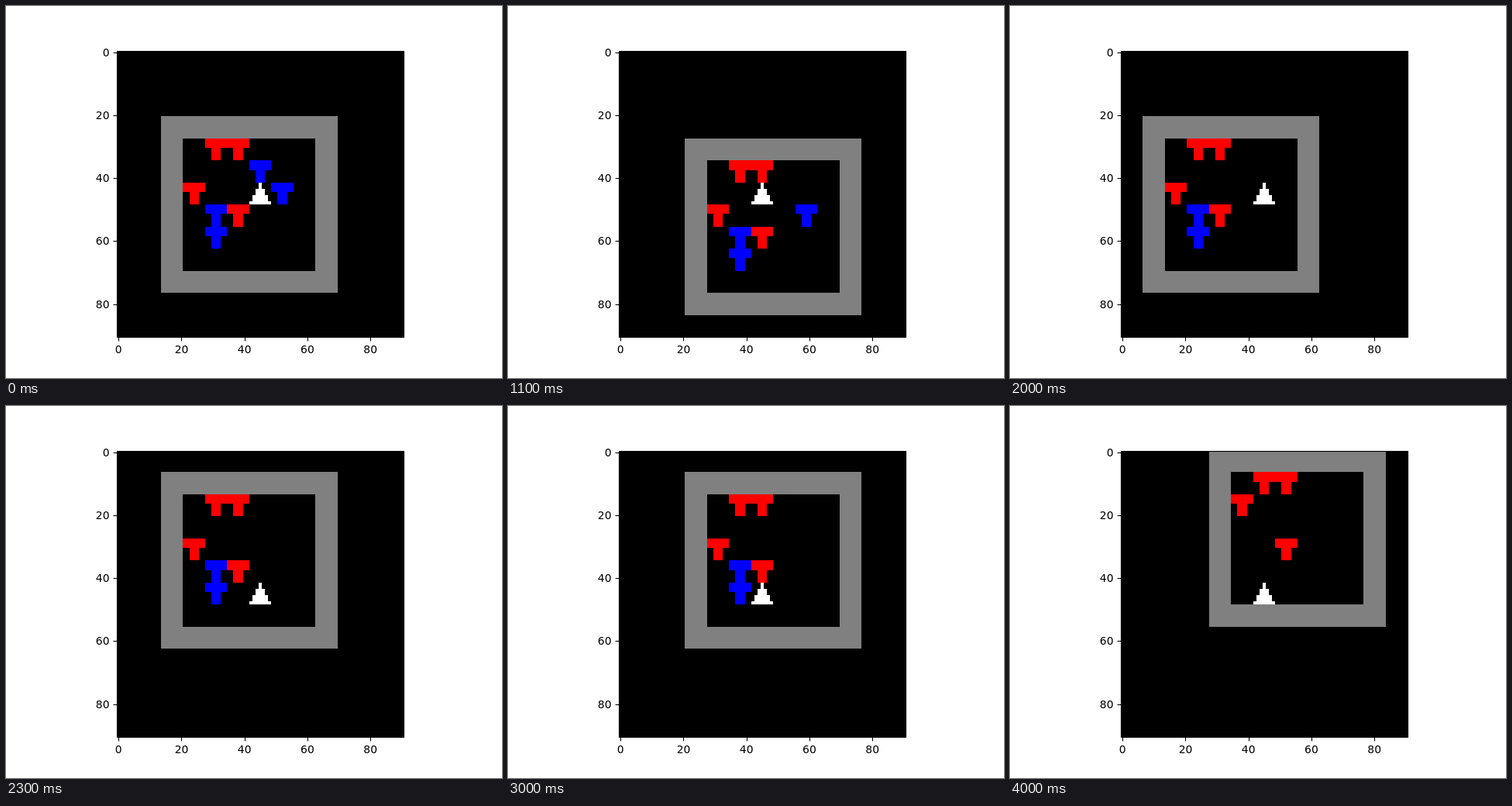
An HTML page with a canvas that plays this animation: 640x480 px, repeating every 4100 ms.

```html
<!DOCTYPE html>
<html lang="en">
<head>
<meta charset="utf-8">
<title>Block pushing grid</title>
<style>
  html, body { margin: 0; width: 100%; height: 100%; overflow: hidden; background: #fff; }
  canvas, svg { position: absolute; left: 0; top: 0; width: 640px; height: 480px; }
  svg path, svg rect { fill: none; stroke: #000; stroke-width: 1.11px; }
  svg text { font: 13.889px "DejaVu Sans", sans-serif; fill: #000; }
</style>
</head>
<body>
<canvas id="board" width="640" height="480"></canvas>
<svg id="axes" viewBox="0 0 640 480"><rect x="143.5" y="58.5" width="370" height="369"/></svg>
<script>
const STEP_MS = 100, LOOP_MS = 4100;
const CELL = 7, VIEW = 91, ROOM = 8, CENTER = 6;
const RED = '#f00', BLUE = '#00f';

// One letter per step; a dot is a step without movement.
const MOVES = 'UU..DU.DDLUDUDRRRDLULDDURDLUDLLLU.U.RDDD';
const DIRS = { U: [0, -1], D: [0, 1], L: [-1, 0], R: [1, 0], '.': [0, 0] };

const ctx = document.getElementById('board').getContext('2d');
ctx.beginPath();
ctx.rect(143, 58, 370, 369);
ctx.clip();

const block = (x, y, color) => ({ x, y, color });
const isWall = v => v < 1 || v > ROOM - 2;

function startState() {
  return {
    x: 4, y: 3,
    blocks: [
      block(2, 1, RED), block(3, 1, RED), block(1, 3, RED), block(3, 4, RED),
      block(4, 2, BLUE), block(5, 3, BLUE), block(2, 4, BLUE), block(2, 5, BLUE)
    ]
  };
}

// The agent pushes blocks ahead; a block pushed into the wall vanishes.
function advance(state, move) {
  const [dx, dy] = DIRS[move];
  state.x += dx;
  state.y += dy;
  const pushed = state.blocks.find(b => b.x === state.x && b.y === state.y);
  if (!pushed) return;
  pushed.x += dx;
  pushed.y += dy;
  state.blocks = state.blocks.filter(b => !isWall(b.x) && !isWall(b.y));
}

function stateAt(step) {
  const state = startState();
  for (const move of MOVES.slice(0, step)) advance(state, move);
  return state;
}

const snapX = px => Math.round(143 + px * 370 / VIEW);
const snapY = px => Math.round(57 + px * 370 / VIEW);

function fill(color, x, y, w, h) {
  const left = snapX(x), top = snapY(y);
  ctx.fillStyle = color;
  ctx.fillRect(left, top, snapX(x + w) - left, snapY(y + h) - top);
}

function drawBlock(x, y, color) {
  fill(color, x, y, 7, 3);
  fill(color, x + 2, y + 3, 3, 4);
}

function drawAgent(x, y) {
  for (let row = 0; row < CELL; row++) {
    const half = row >> 1;
    fill('#fff', x + 3 - half, y + row, 2 * half + 1, 1);
  }
}

function draw(step) {
  const { x, y, blocks } = stateAt(step);
  const left = (CENTER - x) * CELL, top = (CENTER - y) * CELL;
  const inner = (ROOM - 2) * CELL;
  fill('#000', 0, 0, VIEW, VIEW);
  fill('#808080', left, top, ROOM * CELL, ROOM * CELL);
  fill('#000', left + CELL, top + CELL, inner, inner);
  for (const b of blocks) drawBlock(left + b.x * CELL, top + b.y * CELL, b.color);
  drawAgent(CENTER * CELL, CENTER * CELL);
}

function addAxes() {
  const svg = document.getElementById('axes');
  const add = (tag, attrs, text = '') => {
    const el = document.createElementNS(svg.namespaceURI, tag);
    for (const name in attrs) el.setAttribute(name, attrs[name]);
    el.textContent = text;
    svg.append(el);
  };
  for (let value = 0; value <= 80; value += 20) {
    const offset = (value + 0.5) * 369.6 / VIEW;
    const x = 143.2 + offset, y = 57.6 + offset;
    add('path', { d: `M${Math.round(x) + 0.5} 427.5v5` });
    add('path', { d: `M143.5 ${Math.round(y) + 0.5}h-5` });
    add('text', { x, y: 448, 'text-anchor': 'middle' }, value);
    add('text', { x: 133.5, y: Math.round(y + 5.1), 'text-anchor': 'end' }, value);
  }
}

let shown = -1;
function tick() {
  const step = Math.floor(performance.now() % LOOP_MS / STEP_MS);
  if (step !== shown) draw(shown = step);
  requestAnimationFrame(tick);
}

addAxes();
tick();
</script>
</body>
</html>
```
